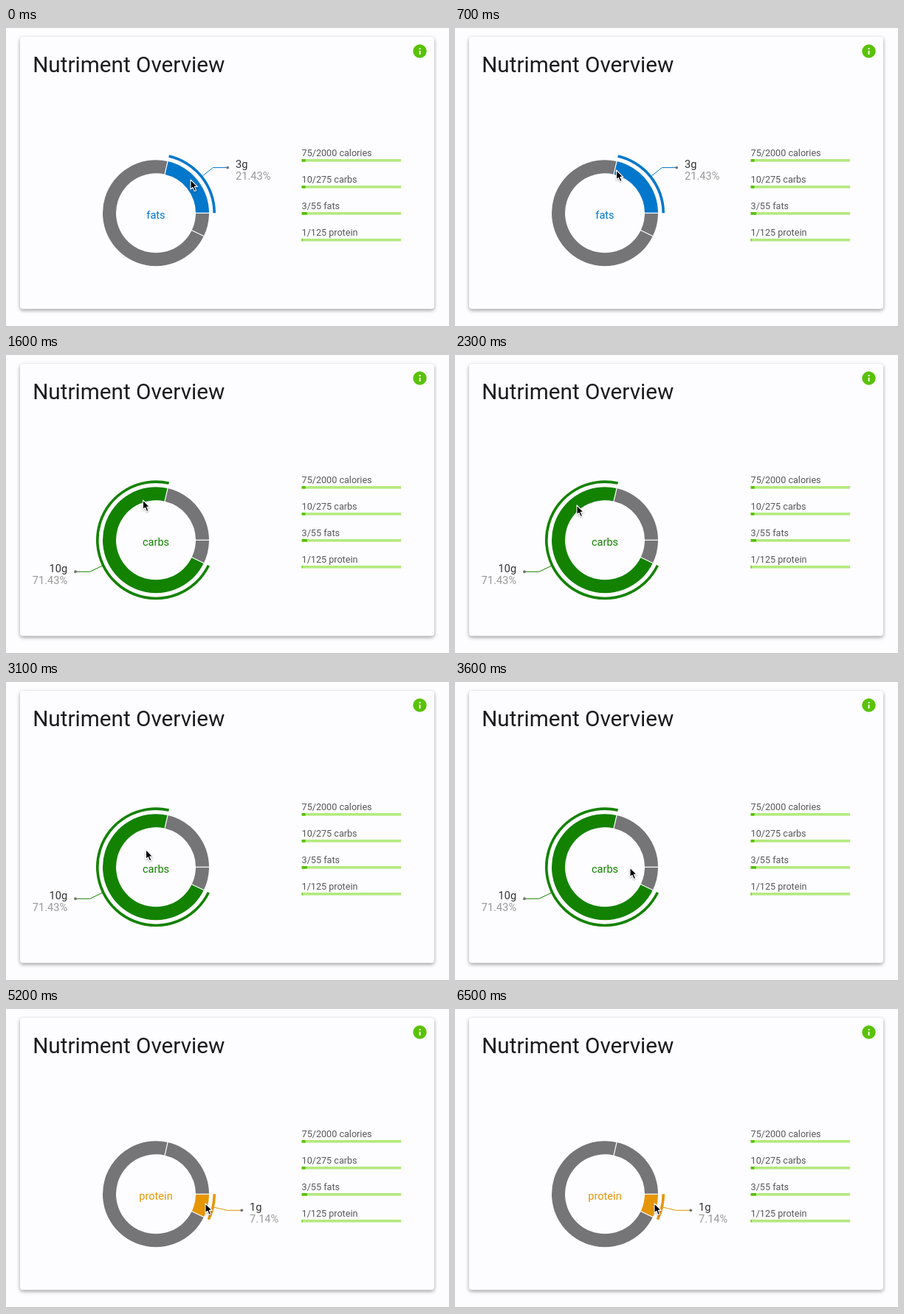
Recreate the animation shown at these times as an HTML page. Size 600 by 406 pixels, loop 6600 ms.

```html
<!DOCTYPE html>
<html lang="en">
<head>
<meta charset="utf-8">
<title>Nutriment Overview</title>
<style>
  html, body { margin: 0; width: 100%; height: 100%; overflow: hidden; background: #fdfcfe; }
  svg { display: block; width: 600px; height: 406px; font-family: Roboto, "Open Sans", sans-serif; }
  .card { fill: #fdfcfe; filter: drop-shadow(0 2px 2.5px rgba(0, 0, 0, .38)); }
  .title { font-size: 29.7px; fill: #1b1a1d; }
  .row { font-size: 12.6px; fill: #585759; }
  .chart { font-size: 14.6px; }
  .pointer { filter: drop-shadow(0 1px 1px rgba(0, 0, 0, .3)); }
</style>
</head>
<body>
<svg id="stage" viewBox="0 0 600 406">
  <rect width="600" height="406" fill="#fdfcfe"/>
  <rect y="405" width="600" height="1" fill="#b9b8ba"/>
  <rect class="card" x="19" y="12" width="561" height="369.5" rx="4"/>
  <text class="title" x="36.2" y="60">Nutriment Overview</text>
  <circle cx="560.5" cy="31.5" r="9.2" fill="#59c206"/>
  <path d="M559.6 27h1.9v1.9h-1.9zM559.6 30.7h1.9v5.4h-1.9z" fill="#fff"/>
  <g id="rows"></g>
  <g id="chart" class="chart"></g>
  <path id="pointer" class="pointer" fill="#000" stroke="#fff" stroke-width="1.1" stroke-linejoin="round"
    d="M0 0V13L2.9 10.3L5.1 15.4L7.5 14.4L5.3 9.4H9.3Z"/>
</svg>
<script>
const NS = 'http://www.w3.org/2000/svg';
const LOOP = 6600, STEP = 100;
const CX = 203, CY = 251.3, INNER = 54, OUTER = 72;
const GRAY = '#757476';

const slices = [
  { name: 'fats', grams: 3, color: '#0277cb' },
  { name: 'carbs', grams: 10, color: '#138200' },
  { name: 'protein', grams: 1, color: '#e69505' }
];
const goals = [
  ['calories', 75, 2000], ['carbs', 10, 275], ['fats', 3, 55], ['protein', 1, 125]
];
// Pointer path: time, x, y
const path = [
  [0, 250, 206], [700, 218.5, 193], [1000, 203, 191], [2300, 165, 204],
  [2800, 161, 213], [3600, 237, 252], [3900, 265, 263], [4400, 270, 264]
];

function add(parent, tag, attrs, text) {
  const el = document.createElementNS(NS, tag);
  for (const key in attrs) el.setAttribute(key, attrs[key]);
  if (text !== undefined) el.textContent = text;
  parent.appendChild(el);
  return el;
}

function polar(radius, deg) {
  const a = deg * Math.PI / 180;
  return [CX + radius * Math.cos(a), CY - radius * Math.sin(a)];
}

function sector(r0, r1, from, to) {
  const big = to - from > 180 ? 1 : 0;
  return `M${polar(r1, from)}A${r1} ${r1} 0 ${big} 0 ${polar(r1, to)}` +
    `L${polar(r0, to)}A${r0} ${r0} 0 ${big} 1 ${polar(r0, from)}Z`;
}

const rows = document.getElementById('rows');
goals.forEach(([name, value, goal], i) => {
  const y = 178 + i * 36, width = 134.5;
  add(rows, 'text', { class: 'row', x: 400.6, y: y - 4.4 }, `${value}/${goal} ${name}`);
  add(rows, 'rect', { x: 400.6, y, width, height: 3.6, fill: '#b3ea7f' });
  add(rows, 'rect', { x: 400.6, y, width: width * value / goal, height: 3.6, fill: '#55c000' });
});

const chart = document.getElementById('chart');
const total = slices.reduce((sum, s) => sum + s.grams, 0);
let angle = 0;
for (const s of slices) {
  s.from = angle;
  s.to = angle += 360 * s.grams / total;
  s.shape = add(chart, 'path', { d: sector(INNER, OUTER, s.from, s.to) });
}
for (const s of slices) {
  const [x1, y1] = polar(INNER - 1, s.from), [x2, y2] = polar(OUTER + 1, s.from);
  add(chart, 'line', { x1, y1, x2, y2, stroke: '#fff', 'stroke-width': 1.2 });
}
for (const s of slices) {
  const mid = (s.from + s.to) / 2;
  const side = Math.cos(mid * Math.PI / 180) < 0 ? -1 : 1;
  const start = polar(81, mid), bend = polar(99, mid);
  const endX = bend[0] + side * 19.8, endY = bend[1];
  const x = endX + side * 10.8, anchor = side < 0 ? 'end' : 'start';
  const g = s.detail = add(chart, 'g', {});
  add(g, 'text', { x: CX, y: CY + 7.2, 'text-anchor': 'middle', fill: s.color }, s.name);
  add(g, 'path', { d: sector(77.4, 81, s.from, s.to), fill: s.color });
  add(g, 'path', { d: `M${start}L${bend}L${endX} ${endY}`, fill: 'none', stroke: s.color });
  add(g, 'circle', { cx: endX, cy: endY, r: 1.9, fill: GRAY });
  add(g, 'text', { x, y: endY + .4, 'text-anchor': anchor, fill: '#333' }, s.grams + 'g');
  add(g, 'text', { x, y: endY + 16.6, 'text-anchor': anchor, fill: '#999' },
    (100 * s.grams / total).toFixed(2) + '%');
}

function pointerAt(t) {
  const next = path.findIndex(p => p[0] > t);
  if (next < 0) return path[path.length - 1].slice(1);
  const [t0, x0, y0] = path[next - 1], [t1, x1, y1] = path[next];
  const k = (t - t0) / (t1 - t0);
  return [x0 + (x1 - x0) * k, y0 + (y1 - y0) * k];
}

const pointer = document.getElementById('pointer');
function draw(time) {
  const t = Math.floor(time % LOOP / STEP) * STEP;
  const active = t < 800 ? 0 : t < 3800 ? 1 : 2;
  slices.forEach((s, i) => {
    s.shape.setAttribute('fill', i === active ? s.color : GRAY);
    s.detail.setAttribute('display', i === active ? 'inline' : 'none');
  });
  pointer.setAttribute('transform', `translate(${pointerAt(t)})`);
}

const begin = performance.now();
function tick() {
  draw(performance.now() - begin);
  requestAnimationFrame(tick);
}
tick();
</script>
</body>
</html>
```
